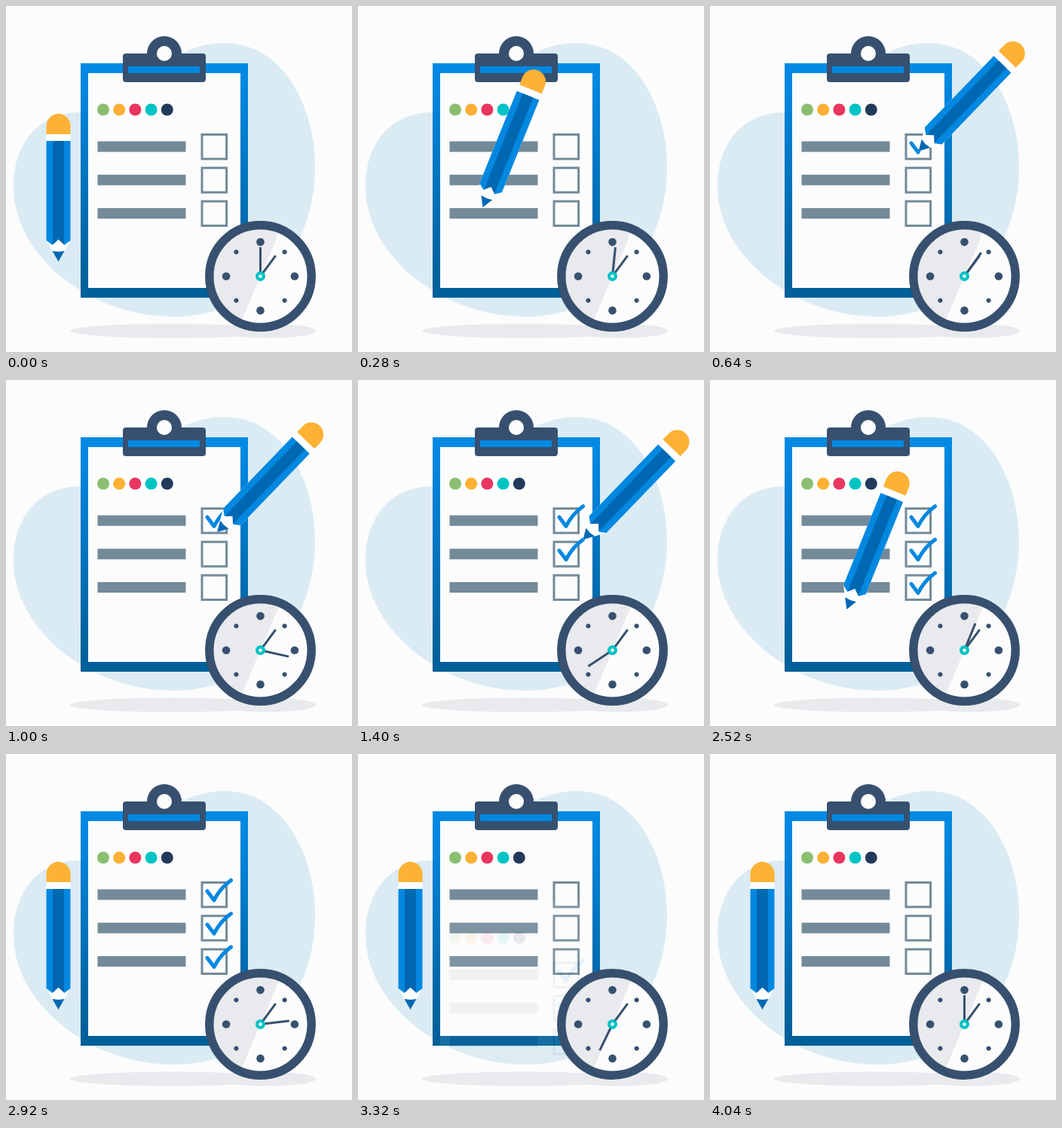
Recreate the animation shown at these times as an HTML page. Size 459 px wide and 459 px high, loop 5 s.

```html
<!DOCTYPE html>
<html lang="en">
<head>
<meta charset="utf-8">
<title>Checklist</title>
<style>
  html, body { margin: 0; height: 100%; overflow: hidden; background: #fcfcfc; }
  svg { display: block; width: 100vw; height: 100vh; }
  .check { fill: none; stroke: #0288e0; stroke-width: 5; stroke-linecap: round; stroke-linejoin: round; }
</style>
</head>
<body>
<svg viewBox="0 0 459 459">
  <defs>
    <linearGradient id="board" x1="0" y1="0" x2="0" y2="1">
      <stop offset="0" stop-color="#028ae4"/>
      <stop offset=".12" stop-color="#0286de"/>
      <stop offset=".85" stop-color="#00639f"/>
      <stop offset="1" stop-color="#006099"/>
    </linearGradient>
    <g id="sheet">
      <path d="M109 89h202v285h-202z" fill="#fcfcfc"/>
      <g id="items"></g>
    </g>
  </defs>

  <path fill="#daebf3" d="M10 240C10 180 45 141 100 141C170 141 200 49 290 49C365 49 410 130 410 213C410 330 330 412 222 412C110 412 10 330 10 240z"/>
  <g fill="#e9eaed">
    <ellipse cx="220" cy="431" rx="135" ry="9.5"/>
    <ellipse cx="347" cy="431" rx="64" ry="9.5"/>
  </g>

  <path d="M99 76h222v311h-222z" fill="url(#board)"/>
  <use href="#sheet"/>
  <g id="page"><use href="#sheet"/></g>

  <g fill="#37506f">
    <rect x="155" y="63" width="110" height="38" rx="4"/>
    <circle cx="210" cy="63" r="23"/>
  </g>
  <circle cx="210" cy="63" r="10" fill="#fcfcfc"/>
  <path d="M162 80h95v9h-95z" fill="#0288e0"/>

  <g id="pencil">
    <path d="M-16-71v-11a16 16 0 0 1 32 0v11z" fill="#fdb236"/>
    <path d="M-16-71h32V70L0 98L-16 70z" fill="#fff"/>
    <path d="M-16-62h32V70L8 76L0 68.5L-8 76L-16 70z" fill="#0288e0"/>
    <path d="M-7.5-62h15V75.5L0 68.5L-7.5 75.5z" fill="#0068b3"/>
    <path d="M-8 84L0 85L8 84L0 98z" fill="#0068b3"/>
  </g>

  <g transform="translate(337.5 358.5)">
    <circle r="67.5" fill="#fcfcfc"/>
    <path d="M0-65A65 65 0 0 0 0 65z" fill="#e9eaed" transform="rotate(23)"/>
    <circle r="67.7" fill="none" stroke="#37506f" stroke-width="11.4"/>
    <g id="marks" fill="#37506f"></g>
    <g stroke="#37506f" stroke-width="3">
      <path d="M0 0V-34" transform="rotate(36.5)"/>
      <path id="minute" d="M0 0V-38.5"/>
    </g>
    <circle r="6.5" fill="#00c1c4"/>
    <circle r="2.3" fill="#fff"/>
  </g>
</svg>
<script>
const $ = id => document.getElementById(id);
const set = (el, attrs) => { for (const k in attrs) el.setAttribute(k, attrs[k]); };
function add(parent, tag, attrs) {
  const el = document.createElementNS('http://www.w3.org/2000/svg', tag);
  set(el, attrs);
  parent.append(el);
  return el;
}

const LOOP = 5000, STEP = 40, ROW = 44.3, TILT = 44;

['#8abf70', '#fdb034', '#ea3560', '#00c4c4', '#213a5c'].forEach((fill, i) =>
  add($('items'), 'circle', { cx: 129 + i * 21.2, cy: 137.5, r: 8, fill }));

const checks = [0, 1, 2].map(i => {
  const y = i * ROW;
  add($('items'), 'rect', { x: 121.5, y: 179.5 + y, width: 117, height: 14, fill: '#738a99' });
  add($('items'), 'rect', { x: 260, y: 170.5 + y, width: 32.6, height: 32.4,
    fill: 'none', stroke: '#738a99', 'stroke-width': 3 });
  return add($('page'), 'path', { class: 'check', d: `M267 ${182 + y}l9 12q8-16 22.5-26.5` });
});

for (let i = 0; i < 8; i++)
  add($('marks'), 'circle', { cy: -45.4, r: i % 2 ? 3 : 5.3, transform: `rotate(${i * 45})` });

const clamp = v => Math.min(1, Math.max(0, v));
const span = (t, from, to) => clamp((t - from) / (to - from));

// Cubic Bezier easing with control points (a, 0) and (b, 1)
function ease(x, a = 1 / 3, b = 2 / 3) {
  let lo = 0, hi = 1, s;
  for (let i = 0; i < 24; i++) {
    s = (lo + hi) / 2;
    const at = 3 * s * (1 - s) ** 2 * a + 3 * s * s * (1 - s) * b + s ** 3;
    if (at < x) lo = s; else hi = s;
  }
  return s * s * (3 - 2 * s);
}

// Pencil centre and angle while its tip writes check i
function writing(i, p) {
  const tip = checks[i].getPointAtLength(p * checks[i].getTotalLength());
  const a = TILT * Math.PI / 180;
  return [tip.x + 98 * Math.sin(a), tip.y - 98 * Math.cos(a), TILT];
}

const rest = [69.5, 241, 0];
const strokes = [[560, 800], [1160, 1400], [1870, 2110]];
const moves = [
  [0, 560, rest, writing(0, 0)],
  [800, 1160, writing(0, 1), writing(1, 0)],
  [1440, 1870, writing(1, 1), writing(2, 0)],
  [2240, 2800, writing(2, 1), rest]
];

function pencilPose(t) {
  const i = strokes.findIndex(([a, b]) => t >= a && t <= b);
  if (i >= 0) return writing(i, span(t, ...strokes[i]));
  const [a, b, from, to] = moves.findLast(m => t >= m[0]);
  const p = ease(span(t, a, b));
  return from.map((v, k) => v + (to[k] - v) * p);
}

function draw(t) {
  const [x, y, angle] = pencilPose(t);
  set($('pencil'), { transform: `translate(${x} ${y}) rotate(${angle})` });

  checks.forEach((el, i) => {
    const p = span(t, ...strokes[i]), len = el.getTotalLength();
    set(el, { 'stroke-dasharray': `${p * len} ${len * 2}`, opacity: p > 0 ? 1 : 0 });
  });

  const slide = span(t, 2920, 3360);
  set($('page'), { transform: `translate(0 ${109 * ease(slide)})`, opacity: 1 - slide });

  const turn = t < 4000 ? ease(t % 2000 / 2000, 2 / 3, 2 / 3) : 0;
  set($('minute'), { transform: `rotate(${360 * turn})` });
}

const start = performance.now();
function tick() {
  const t = (performance.now() - start) % LOOP;
  draw(t - t % STEP);
  requestAnimationFrame(tick);
}
tick();
</script>
</body>
</html>
```
